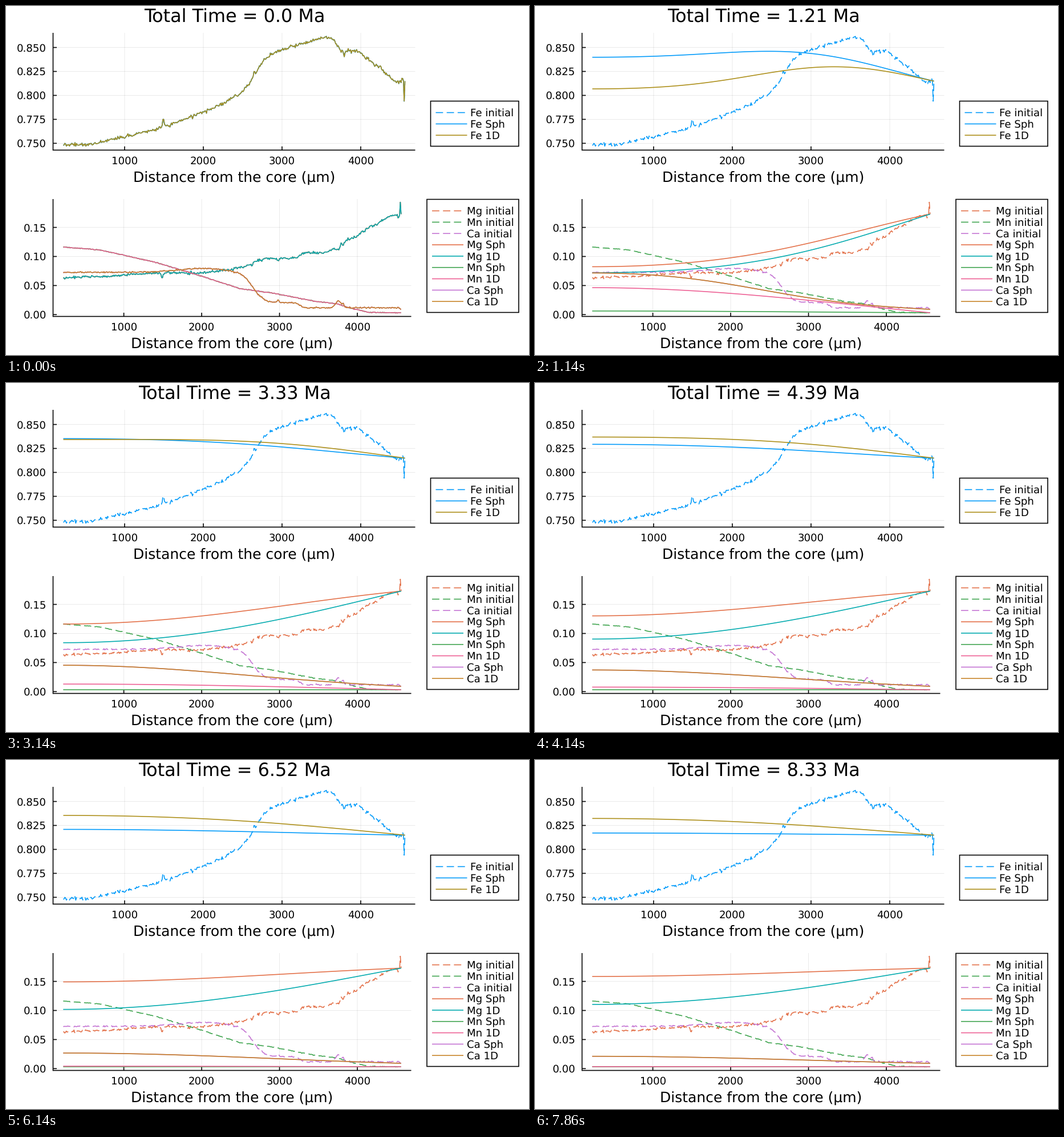
These frames come from a looping animation (917 px wide and 611 px high, 8000 ms). A matplotlib script:

```python
import matplotlib.pyplot as plt
import numpy as np
from matplotlib.animation import FuncAnimation
from matplotlib.patches import Rectangle

W, H, DPI = 917, 611, 72          # at 72 dpi one point is one pixel
LOOP, TICK, FPS = 8000, 50, 7     # ms per loop, ms per drawn frame, steps per second
STEPS = LOOP * FPS // 1000
STEP_MA = 10 / 66
X0, X1 = 221.0, 4562.0            # profile extent in µm
LW = 1.6

BLUE, ORANGE, GREEN, PURPLE = "#009AFA", "#E36F47", "#3EA44E", "#C371D2"
OLIVE, TEAL, PINK, OCHRE = "#AC8E18", "#00AAAE", "#ED5E93", "#C68225"


# ---------- measured profiles ----------
def bump(x, centre, width):
    return np.exp(-((x - centre) / width) ** 2)


def fall(x, centre, width):
    return 0.5 - 0.5 * np.tanh((x - centre) / (2 * width))


def iron(x):
    trend = np.interp(
        x,
        [221, 580, 1014, 1427, 2000, 2210, 2464, 2594, 2768, 2898,
         3230, 3550, 3650, 3750, 3963, 4449, 4510, 4562],
        [.7485, .749, .7573, .7648, .7825, .79, .8014, .8133, .8365, .8445,
         .8535, .861, .858, .8465, .847, .814, .8135, .8149])
    return (trend + .009 * bump(x, 1493, 12) + .005 * bump(x, 2645, 10)
            - .007 * bump(x, 3790, 9) + .004 * bump(x, 4248, 14)
            + .0055 * bump(x, 4529, 10) - .0207 * bump(x, 4552, 4))


def manganese(x):
    return np.interp(
        x,
        [221, 700, 1391, 2000, 2490, 2930, 3479, 3740, 3900, 4150, 4562],
        [.1165, .111, .0905, .0661, .0448, .0366, .0224, .0187, .0115, .0038, .0032])


def calcium(x):
    return (.0091 + .0027 * fall(x, 4547, 3) + .0085 * fall(x, 3265, 22)
            + .0525 * fall(x, 2655, 70) + .0065 * bump(x, 2000, 450)
            + .005 * bump(x, 2981, 18) + .0115 * bump(x, 3755, 50)
            + .005 * bump(x, 3818, 18))


def composition(x, scatter=0.0):
    """Columns Mg, Mn, Ca; magnesium closes the sum with iron."""
    rng = np.random.default_rng(4)
    fe, mn, ca = (f(x) + scatter * s * rng.normal(size=x.size) * (x < 4540)
                  for f, s in ((iron, .9), (manganese, .3), (calcium, .55)))
    return np.column_stack([1 - fe - mn - ca, mn, ca])


def fe_of(c):
    return 1 - c.sum(axis=1)


x_fine = np.linspace(X0, X1, 440)
x_grid = np.linspace(X0, X1, 101)
start = composition(x_fine, .001)


# ---------- multicomponent diffusion in garnet ----------
def tracer(d0, energy, volume, temp=1173.15, pressure=0.6e9):
    """Tracer diffusivity in µm² per Ma."""
    return d0 * np.exp(-(energy + pressure * volume) / (8.314 * temp)) * 1e12 * 3.156e13


D_FE = tracer(6.4e-8, 275432, 5.6e-6)
D = np.array([tracer(1.1e-7, 284512, 5.3e-6),
              tracer(5.1e-8, 253443, 6.0e-6),
              0.5 * D_FE])


def diffusion_matrix(c):
    total = c @ D + fe_of(c) * D_FE
    cross = (D * c / total[:, None])[:, :, None] * (D - D_FE)
    return np.diag(D) - cross


def simulate(spherical, substeps=4):
    """Implicit finite volumes: no flux at the core, fixed rim."""
    n = x_grid.size
    r = x_grid - X0
    h, dt = r[1], STEP_MA / substeps
    face = r[:-1] + h / 2
    edges = np.concatenate(([0], face, [r[-1]]))
    area = face ** 2 if spherical else np.ones(n - 1)
    vol = np.diff(edges ** 3) / 3 if spherical else np.diff(edges)
    inv = (1 / vol)[:, None, None]
    k = np.arange(n - 1)
    c = composition(x_grid)
    states = [c]
    for _ in range(1, STEPS):
        for _ in range(substeps):
            g = dt * area[:, None, None] / h * diffusion_matrix((c[1:] + c[:-1]) / 2)
            a = np.zeros((n, 3, n, 3))
            a[k, :, k, :] += g * inv[:-1]
            a[k, :, k + 1, :] -= g * inv[:-1]
            a[k + 1, :, k, :] -= g * inv[1:]
            a[k + 1, :, k + 1, :] += g * inv[1:]
            a[-1] = 0
            system = np.eye(3 * n) + a.reshape(3 * n, 3 * n)
            c = np.linalg.solve(system, c.ravel()).reshape(n, 3)
        states.append(c)
    return states


sphere, planar = simulate(True), simulate(False)

# ---------- stage ----------
plt.rcParams["font.family"] = "DejaVu Sans"
plt.rcParams["text.hinting"] = "none"
fig = plt.figure(figsize=(W / DPI, H / DPI), dpi=DPI, facecolor="white")
ax = fig.add_axes([0, 0, 1, 1])
ax.set_xlim(0, W)
ax.set_ylim(H, 0)
ax.axis("off")


def stroke(xs, ys, color="black", lw=LW, dashed=False, **kw):
    style = (0, (8, 4)) if dashed else "-"
    return ax.plot(xs, ys, color=color, lw=lw, ls=style, dash_capstyle="butt",
                   solid_capstyle="butt", solid_joinstyle="round",
                   snap=False, **kw)[0]


def label(x, y, text, size=18.18, ha="center"):
    return ax.text(x, y, text, fontsize=size, ha=ha, va="baseline")


class Panel:
    def __init__(self, right, top, bottom, y_ref, v_ref, scale, ticks, fmt):
        self.left, self.right = 82.5, right
        self.y_ref, self.v_ref, self.scale = y_ref, v_ref, scale
        span = right - self.left
        self.x_first = self.left + span * .03 / 1.06
        self.x_scale = span / 1.06 / (X1 - X0)
        for um in range(1000, 5000, 1000):
            x = self.px(um)
            stroke([x, x], [top, bottom], lw=.8, alpha=.1)
            stroke([x, x], [bottom, bottom - 6.5])
            label(x, bottom + 24.5, str(um))
        for v in ticks:
            y = self.py(v)
            stroke([self.left, right], [y, y], lw=.8, alpha=.1)
            stroke([self.left, self.left + 6.5], [y, y])
            label(71, y + 6.7, format(v, fmt), ha="right")
        stroke([self.left, self.left], [top, bottom + LW / 2])
        stroke([self.left, right], [bottom, bottom])
        label((self.left + right) / 2, bottom + 55.3,
              "Distance from the core (µm)", 25)

    def px(self, um):
        return self.x_first + (um - X0) * self.x_scale

    def py(self, v):
        return self.y_ref - (v - self.v_ref) * self.scale

    def curve(self, color, dashed=False):
        return stroke([], [], color, dashed=dashed)

    def put(self, line, x, v):
        line.set_data(self.px(x), self.py(v))


def legend(x, y, w, h, first, entries):
    ax.add_patch(Rectangle((x, y), w, h, fc="white", ec="black", lw=LW, snap=False))
    for i, (name, color, dashed) in enumerate(entries):
        cy = first + 19.83 * i
        stroke([x + 9, x + 64], [cy, cy], color, dashed=dashed)
        label(x + 69.8, cy + 6.4, name, ha="left")


fe_series = [("Fe initial", BLUE, True), ("Fe Sph", BLUE, False),
             ("Fe 1D", OLIVE, False)]
minor_series = [("Mg initial", ORANGE, True), ("Mn initial", GREEN, True),
                ("Ca initial", PURPLE, True), ("Mg Sph", ORANGE, False),
                ("Mg 1D", TEAL, False), ("Mn Sph", GREEN, False),
                ("Mn 1D", PINK, False), ("Ca Sph", PURPLE, False),
                ("Ca 1D", OCHRE, False)]

upper = Panel(717.5, 47, 252.3, 72.6, .85, 1678,
              np.arange(.75, .86, .025), ".3f")
lower = Panel(710.5, 338, 543.5, 540.3, 0, 1018,
              np.arange(0, .16, .05), ".2f")
legend(744.5, 166.5, 154.5, 79, 186.6, fe_series)
legend(738, 338.5, 161, 198, 358.6, minor_series)

fe_lines = [upper.curve(c, d) for _, c, d in fe_series]
minor_lines = [lower.curve(c, d) for _, c, d in minor_series]
title = label(401.3, 27.7, "", 31.82)

upper.put(fe_lines[0], x_fine, fe_of(start))
for line, values in zip(minor_lines, start.T):
    lower.put(line, x_fine, values)


def update(frame):
    step = min(int((frame * TICK + 45) * FPS / 1000), STEPS - 1)
    if step == 0:
        x, s, p = x_fine, start, start
    else:
        x, s, p = x_grid, sphere[step], planar[step]
    upper.put(fe_lines[1], x, fe_of(s))
    upper.put(fe_lines[2], x, fe_of(p))
    # both calcium curves follow the spherical solution
    minor = (s[:, 0], p[:, 0], s[:, 1], p[:, 1], s[:, 2], s[:, 2])
    for line, v in zip(minor_lines[3:], minor):
        lower.put(line, x, v)
    title.set_text(f"Total Time = {round(step * STEP_MA, 2)} Ma")
    return [*fe_lines, *minor_lines, title]


anim = FuncAnimation(fig, update, frames=LOOP // TICK, interval=TICK,
                     init_func=lambda: update(0), repeat=True,
                     repeat_delay=0, blit=False)
plt.show()
```
